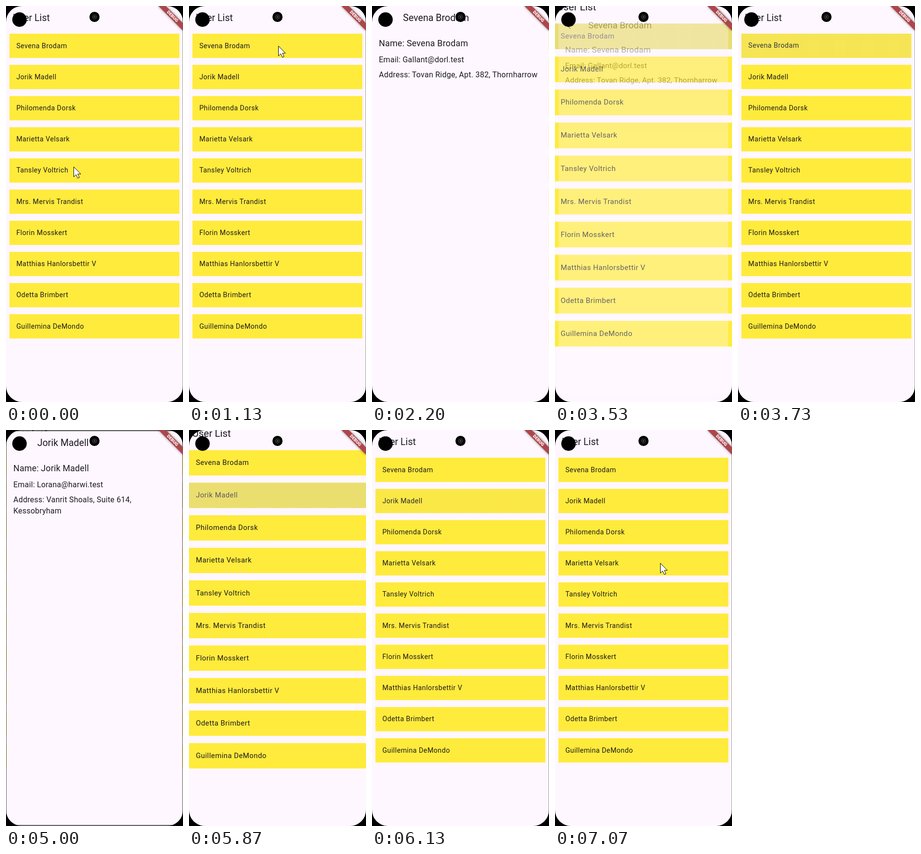
Recreate the animation shown at these times as an HTML page. Size 367 by 816 pixels, loop 8000 ms.

```html
<!DOCTYPE html>
<html lang="en">
<head>
<meta charset="utf-8">
<title>User List</title>
<style>
  html, body { margin: 0; width: 100%; height: 100%; overflow: hidden; background: #000; }
  #stage { position: relative; width: 367px; height: 816px; overflow: hidden; }
  #stage * { position: absolute; box-sizing: border-box; }
  /* The app is laid out in device-independent units and scaled to the screen */
  #app { width: 411.4px; height: 914.8px; transform: scale(.892); transform-origin: 0 0;
         font-family: Roboto, sans-serif; color: #1d1b20; white-space: pre; }
  .page, #scrim { width: 100%; height: 100%; left: 0; top: 0; }
  .page { background: #fef7ff; }
  #scrim { background: #000; }
  .title { left: 16px; top: 0; font-size: 22px; line-height: 56px; }
  #detail .title { left: 72px; }
  .row { left: 8px; right: 8px; height: 56px; padding-left: 16px; background: #ffeb3b;
         font-size: 16px; line-height: 56px; letter-spacing: .5px; }
  .row span { position: static !important; }
  #ripple { left: 8px; right: 8px; height: 56px; }
  .line { left: 16px; font-size: 18px; line-height: 1.43; letter-spacing: .25px; }
  #name { top: 72px; font-size: 20px; }
  #email { top: 110.6px; }
  #address { top: 146.3px; }
  #banner { left: 371.4px; top: 28px; width: 80px; height: 12px; transform-origin: 40px -28px;
            transform: rotate(45deg); background: #ad464a; box-shadow: 0 0 6px rgba(0,0,0,.5);
            color: #fff; font-size: 10.2px; font-weight: 900; line-height: 12px; text-align: center; }
  #bezel { inset: 0; border-radius: 33px; box-shadow: 0 0 0 40px #000; }
  #hole { left: 13px; top: 13px; width: 30px; height: 30px; border-radius: 50%; background: #000; }
  #camera { left: 173px; top: 11.5px; width: 21px; height: 21px; border-radius: 50%;
            background: radial-gradient(circle, #555 0 1px, #151515 1.6px 3px, #343434 4px, #0a0a0a 5.5px, #000 7px); }
  #cursor { left: 0; top: 0; overflow: visible; }
</style>
</head>
<body>
<div id="stage">
  <div id="app">
    <div class="page" id="list"><div class="title">User List</div></div>
    <div id="scrim"></div>
    <div class="page" id="detail">
      <svg width="24" height="24" style="left:16px;top:16px"><path fill="#1d1b20" d="M20 11H7.83l5.59-5.59L12 4l-8 8 8 8 1.41-1.41L7.83 13H20z"/></svg>
      <div class="title" id="heading"></div>
      <div class="line" id="name"></div>
      <div class="line" id="email"></div>
      <div class="line" id="address"></div>
    </div>
    <div id="banner">DEBUG</div>
  </div>
  <div id="hole"></div>
  <div id="camera"></div>
  <div id="bezel"></div>
  <svg id="cursor" width="17" height="26"><path d="M.5.5V21l4.8-4.5 3.4 7.3 3.3-1.5-3.3-7.1H15z" fill="#fff" stroke="#000"/></svg>
</div>
<script>
const LOOP = 8000, STEP = 1000 / 15, DURATION = 300;
const $ = id => document.getElementById(id);

const users = [
  'Sevena Brodam', 'Jorik Madell', 'Philomenda Dorsk', 'Marietta Velsark', 'Tansley Voltrich',
  'Mrs. Mervis Trandist', 'Florin Mosskert', 'Matthias Hanlorsbettir V', 'Odetta Brimbert', 'Guillemina DeMondo'
];
const visits = [
  { user: 0, x: 199, press: 1640, push: 1897, pop: 3483.3,
    email: 'Gallant@dorl.test', address: 'Tovan Ridge, Apt. 382, Thornharrow' },
  { user: 1, x: 207, press: 4810, push: 4830, pop: 5800,
    email: 'Lorana@harwi.test', address: 'Vanrit Shoals, Suite 614,\nKessobryham' }
];
// Pointer paths as [time, x, y]; the pointer is hidden outside them
const paths = [
  [[0, 140, 331], [200, 124, 300], [400, 119, 235], [600, 150, 150], [800, 192, 73],
   [933, 175, 106], [1133, 185, 82], [1466, 185, 82]],
  [[3933, 366, 260], [4133, 270, 185], [4333, 188, 157], [4533, 192, 154], [4866, 192, 154]],
  [[6266, 366, 225], [6466, 300, 245], [6666, 244, 268], [6733, 226, 276], [6933, 226, 276],
   [7066, 218, 274], [LOOP, 218, 274]]
];

const rowTop = i => 64 + 72 * i;
users.forEach((user, i) => {
  const row = document.createElement('div');
  row.className = 'row';
  row.style.top = rowTop(i) + 'px';
  row.innerHTML = `<span>${user}</span>`;
  $('list').append(row);
});
const ripple = document.createElement('div');
ripple.id = 'ripple';
$('list').append(ripple);

const mix = (a, b, p) => a + (b - a) * p;
const span = (t, from, to) => Math.min(1, Math.max(0, (t - from) / (to - from)));

function bezier(x1, y1, x2, y2) {
  const at = (a, b, u) => 3 * (1 - u) ** 2 * u * a + 3 * (1 - u) * u * u * b + u ** 3;
  return x => {
    let low = 0, high = 1;
    for (let i = 0; i < 24; i++) {
      const mid = (low + high) / 2;
      if (at(x1, x2, mid) < x) low = mid; else high = mid;
    }
    return at(y1, y2, low);
  };
}
const rise = bezier(.05, 0, .133333, .06);
const settle = bezier(.208333, .82, .25, 1);
const zoom = t => t < 1 / 6 ? .4 * rise(t * 6) : .4 + .6 * settle((t - 1 / 6) * 1.2);

function showRipple(t, visit) {
  const grow = span(t, visit.press, visit.press + 225);
  const alpha = .4 * (1 - span(t, visit.pop + 40, visit.pop + 415));
  const r = 400 * grow * (2 - grow), color = `rgba(200,200,200,${alpha})`;
  ripple.style.display = grow > 0 && alpha > 0 ? '' : 'none';
  ripple.style.top = rowTop(visit.user) + 'px';
  ripple.style.background = `radial-gradient(circle at ${visit.x}px 28px, ${color} ${r}px, transparent ${r + 1}px)`;
}

function showPages(t, visit) {
  let listScale = 1, scale = 1, opacity = 0, dim = 0;
  const leaving = t >= visit.pop;
  const p = span(t, leaving ? visit.pop : visit.push, (leaving ? visit.pop : visit.push) + DURATION);
  const z = zoom(p);
  if (leaving) {
    listScale = mix(1.1, 1, z);
    scale = mix(1, .9, z);
    opacity = 1 - span(p, .0825, .2075);
  } else {
    listScale = mix(1, 1.05, z);
    scale = mix(.85, 1, z);
    opacity = span(p, .125, .25);
    dim = p < 1 ? .6 * span(p, .2075, .4175) : 0;
  }
  $('list').style.transform = `scale(${listScale})`;
  $('detail').style.transform = `scale(${scale})`;
  $('detail').style.opacity = opacity;
  $('scrim').style.opacity = dim;

  const user = users[visit.user];
  $('heading').textContent = user;
  $('name').textContent = 'Name: ' + user;
  $('email').textContent = 'Email: ' + visit.email;
  $('address').textContent = 'Address: ' + visit.address;
}

function showCursor(t) {
  const path = paths.find(p => t >= p[0][0] && t < p[p.length - 1][0]);
  $('cursor').style.display = path ? '' : 'none';
  if (!path) return;
  const i = path.findIndex(point => point[0] > t);
  const [t0, x0, y0] = path[i - 1], [t1, x1, y1] = path[i];
  const p = span(t, t0, t1);
  $('cursor').style.transform = `translate(${Math.round(mix(x0, x1, p))}px, ${Math.round(mix(y0, y1, p))}px)`;
}

function draw(now) {
  // The screen refreshes fifteen times a second
  const t = Math.floor((now % LOOP + 4) / STEP) * STEP % LOOP;
  const visit = visits[t < 4600 ? 0 : 1];
  showRipple(t, visit);
  showPages(t, visit);
  showCursor(t);
}

const start = performance.now();
function tick() {
  draw(performance.now() - start);
  requestAnimationFrame(tick);
}
tick();
</script>
</body>
</html>
```
